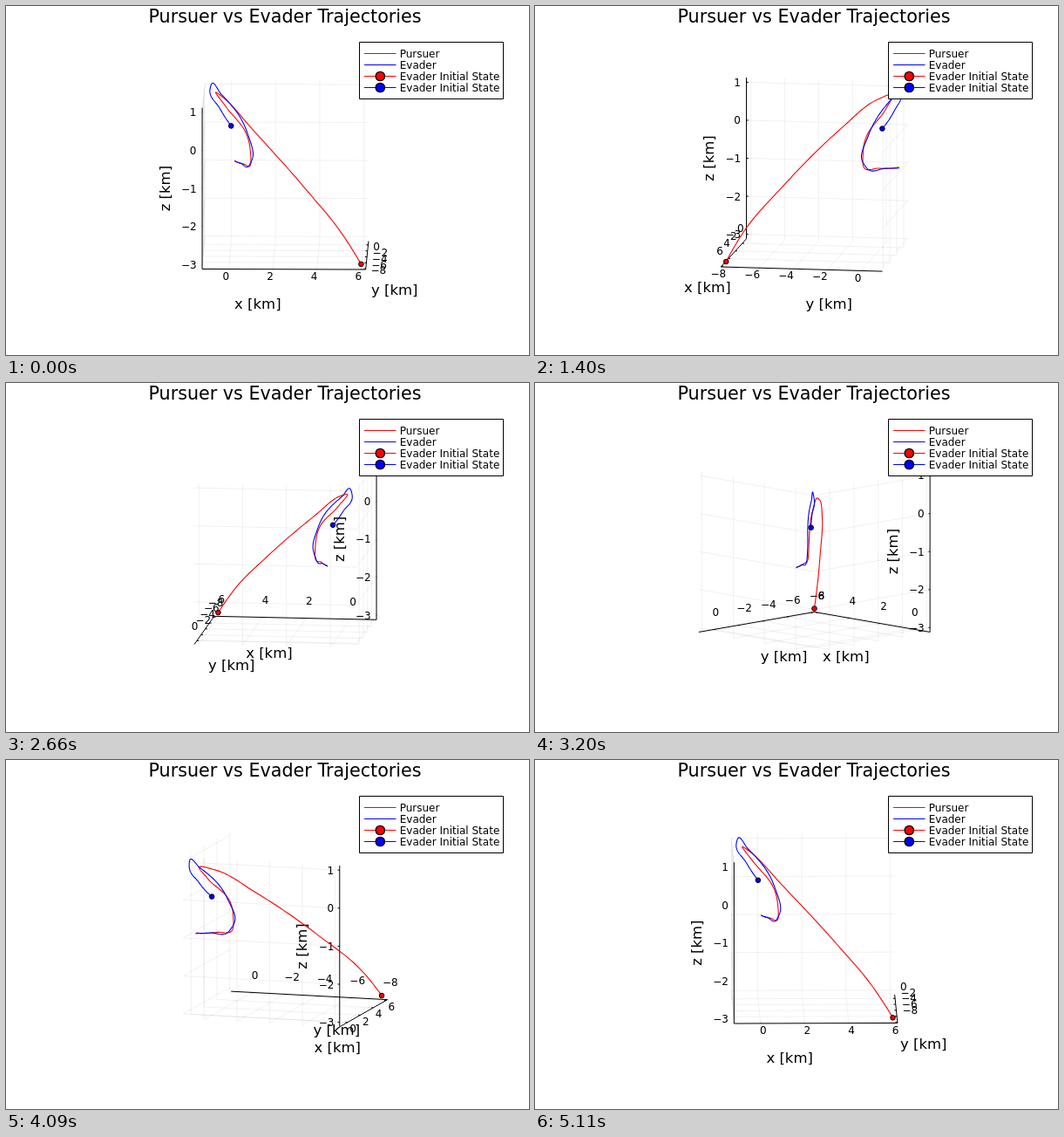
Recreate the animation shown at these times as an HTML page with a canvas. Size 600 by 400 pixels, loop 5.13 s.

```html
<!DOCTYPE html>
<html lang="en">
<head>
<meta charset="utf-8">
<title>Pursuer vs Evader Trajectories</title>
<style>
  html, body { margin: 0; width: 100%; height: 100%; overflow: hidden; background: #fff; }
  canvas { display: block; }
</style>
</head>
<body>
<canvas id="stage" width="600" height="400"></canvas>
<script>
const ctx = document.getElementById('stage').getContext('2d');
const LOOP = 5130, STEPS = 180;
const CX = 320.5, CY = 193.1, SIZE = 93.8;
const TILT = 10 * Math.PI / 180;
const RED = '#f00', BLUE = '#00f', BLACK = '#000', GRID = 'rgba(0,0,0,0.1)';
const FONT = '"DejaVu Sans", Verdana, sans-serif';

// An axis spans its data plus 3 % at both ends.
function makeAxis(lo, hi, first, last, step) {
  const pad = 0.03 * (hi - lo), ticks = [];
  for (let v = first; v <= last; v += step) ticks.push(v);
  return { min: lo - pad, max: hi + pad, span: hi - lo + 2 * pad, ticks };
}
const X = makeAxis(-0.99, 6, 0, 6, 2);
const Y = makeAxis(-8, 1, -8, 0, 2);
const Z = makeAxis(-3, 1, -3, 1, 1);
const unit = (axis, v) => 2 * (v - axis.min) / axis.span - 1;

// Key positions in km, joined by a smooth curve.
const pursuer = smooth([
  [6, -8, -3], [5.25, -7.25, -2.37], [3.43, -5.17, -1.24], [1.02, -2.24, .07],
  [-.27, -.35, .73], [-.7, .51, .82], [-.25, .17, .5], [.87, -.95, -.51],
  [.91, -.95, -.87], [.54, -.07, -.99], [.14, 1.01, -.99]
]);
const evader = smooth([
  [0, 0, 0], [-.53, .6, .42], [-.97, 1, .89], [-.92, 1, 1], [-.46, .55, .79],
  [.75, -.69, -.14], [1.01, -1.02, -.69], [.84, -.73, -.97], [.43, .27, -1], [.15, 1.05, -1.01]
]);

// Hermite curve whose tangents weigh both neighbouring chords by length.
function smooth(pts) {
  const last = pts.length - 1, n = 16, out = [];
  const len = [], slope = [];
  for (let i = 0; i < last; i++) {
    len[i] = Math.hypot(...pts[i].map((p, k) => pts[i + 1][k] - p));
    slope[i] = pts[i].map((p, k) => (pts[i + 1][k] - p) / len[i]);
  }
  const tan = pts.map((_, i) => i % last ? slope[i].map((s, k) =>
    (s * len[i - 1] + slope[i - 1][k] * len[i]) / (len[i - 1] + len[i])) : null);
  tan[0] = slope[0].map((s, k) => 2 * s - tan[1][k]);
  tan[last] = slope[last - 1].map((s, k) => 2 * s - tan[last - 1][k]);
  for (let i = 0; i < last; i++) {
    for (let j = 0; j < n; j++) {
      const u = j / n, w = 1 - u;
      out.push(pts[i].map((p, k) =>
        w * w * (1 + 2 * u) * p + u * u * (3 - 2 * u) * pts[i + 1][k] +
        len[i] * u * w * (w * tan[i][k] - u * tan[i + 1][k])));
    }
  }
  out.push(pts[last]);
  return out;
}

let cosA = 1, sinA = 0;

function project([px, py, pz]) {
  const x = unit(X, px), y = unit(Y, py), z = unit(Z, pz);
  const depth = y * cosA - x * sinA;
  return [
    CX + SIZE * (x * cosA + y * sinA),
    CY - SIZE * (Math.sin(TILT) * depth + Math.cos(TILT) * z)
  ];
}

function line(pts, color, width = 1) {
  ctx.beginPath();
  pts.forEach(p => ctx.lineTo(p[0], p[1]));
  ctx.strokeStyle = color;
  ctx.lineWidth = width;
  ctx.lineJoin = 'round';
  ctx.stroke();
}

const line3 = (pts, color, width) => line(pts.map(project), color, width);

function dot(x, y, r, color, width) {
  ctx.beginPath();
  ctx.arc(x, y, r, 0, 2 * Math.PI);
  ctx.fillStyle = color;
  ctx.fill();
  ctx.strokeStyle = BLACK;
  ctx.lineWidth = width;
  ctx.stroke();
}

function text(str, x, y, size, align = 'center') {
  ctx.font = `${size}px ${FONT}`;
  ctx.textAlign = align;
  ctx.fillStyle = BLACK;
  ctx.fillText(str, x, y);
}

function tickLabel(v, x, y) {
  text(v < 0 ? '\u2212' + -v : String(v), x, y + 4.5, 12);
}

const halfWidth = v => v < 0 ? 7.9 : 3;

function drawGrid() {
  const rule = pts => line3(pts, GRID, 0.6);
  for (const v of X.ticks) rule([[v, Y.min, Z.min], [v, Y.max, Z.min], [v, Y.max, Z.max]]);
  for (const v of Y.ticks) rule([[X.max, v, Z.min], [X.min, v, Z.min], [X.min, v, Z.max]]);
  for (const v of Z.ticks) rule([[X.min, Y.min, v], [X.min, Y.max, v], [X.max, Y.max, v]]);
}

// Labels sit off the axis at a right angle, pushed aside by half their width.
function floorAxis(axis, at) {
  const from = project(at(axis.min, 0)), to = project(at(axis.max, 0));
  line([from, to], BLACK);
  const dx = to[0] - from[0], dy = to[1] - from[1], len = Math.hypot(dx, dy);
  const cos = dx / len, sin = -dy / len;
  const side = cos > 0 && sin < 0 ? -1 : 1;
  const drop = 6.5 * cos + (cos > 0 ? 1.1 : -13.3);
  for (const v of axis.ticks) {
    const [x, y] = project(at(v, 0));
    line3([at(v, 0), at(v, 0.012)], BLACK);
    tickLabel(v, x + 6.7 * sin + side * halfWidth(v), y + drop);
  }
}

function drawAxes() {
  floorAxis(X, (v, inset) => [v, Y.min + inset * Y.span, Z.min]);
  floorAxis(Y, (v, inset) => [X.max - inset * X.span, v, Z.min]);
  line3([[X.min, Y.min, Z.min], [X.min, Y.min, Z.max]], BLACK);
  for (const v of Z.ticks) {
    const [x, y] = project([X.min, Y.min, v]);
    line3([[X.min, Y.min, v], [X.min, Y.min + 0.012 * Y.span, v]], BLACK);
    tickLabel(v, x - 7.4 - halfWidth(v), y);
  }

  const mid = axis => axis.min + axis.span / 2;
  const mx = project([mid(X), Y.min, Z.min]);
  const my = project([X.max, mid(Y), Z.min]);
  const mz = project([X.min, Y.min, mid(Z)]);
  text('x [km]', mx[0] - 30, mx[1] + 45.2, 16.5);
  text('y [km]', my[0] + 31.4, my[1] + 45.4, 16.5);
  ctx.save();
  ctx.translate(mz[0] - 37.4, mz[1]);
  ctx.rotate(-Math.PI / 2);
  text('z [km]', 0, 0, 16.5);
  ctx.restore();
}

function drawLegend() {
  ctx.fillStyle = '#fff';
  ctx.fillRect(405.5, 41.5, 165, 65);
  ctx.strokeStyle = BLACK;
  ctx.lineWidth = 1;
  ctx.strokeRect(405.5, 41.5, 165, 65);
  const rows = [
    ['Pursuer', RED], ['Evader', BLUE],
    ['Evader Initial State', RED, true], ['Evader Initial State', BLUE, true]
  ];
  rows.forEach(([name, color, marked], i) => {
    const y = 54.5 + 13 * i;
    line([[411, y], [447.5, y]], color);
    if (marked) dot(429.3, y, 5.2, color, 1.3);
    text(name, 451.7, y + 4.5, 12, 'left');
  });
}

function draw(step) {
  const a = (1 + 2 * step) * Math.PI / 180;
  cosA = Math.cos(a);
  sinA = Math.sin(a);
  ctx.fillStyle = '#fff';
  ctx.fillRect(0, 0, 600, 400);
  drawGrid();
  drawAxes();
  line3(pursuer, RED, 1.1);
  line3(evader, BLUE, 1.1);
  dot(...project(pursuer[0]), 2.8, RED, 1);
  dot(...project(evader[0]), 2.8, BLUE, 1);
  text('Pursuer vs Evader Trajectories', 320, 18.5, 20.7);
  drawLegend();
}

// 35 pictures a second, held on a 10 ms clock.
const start = performance.now();
function tick() {
  const t = Math.floor((performance.now() - start) % LOOP / 10) * 10;
  draw(Math.min(STEPS - 1, Math.floor((t + 5) * 7 / 200)));
  requestAnimationFrame(tick);
}
tick();
</script>
</body>
</html>
```
